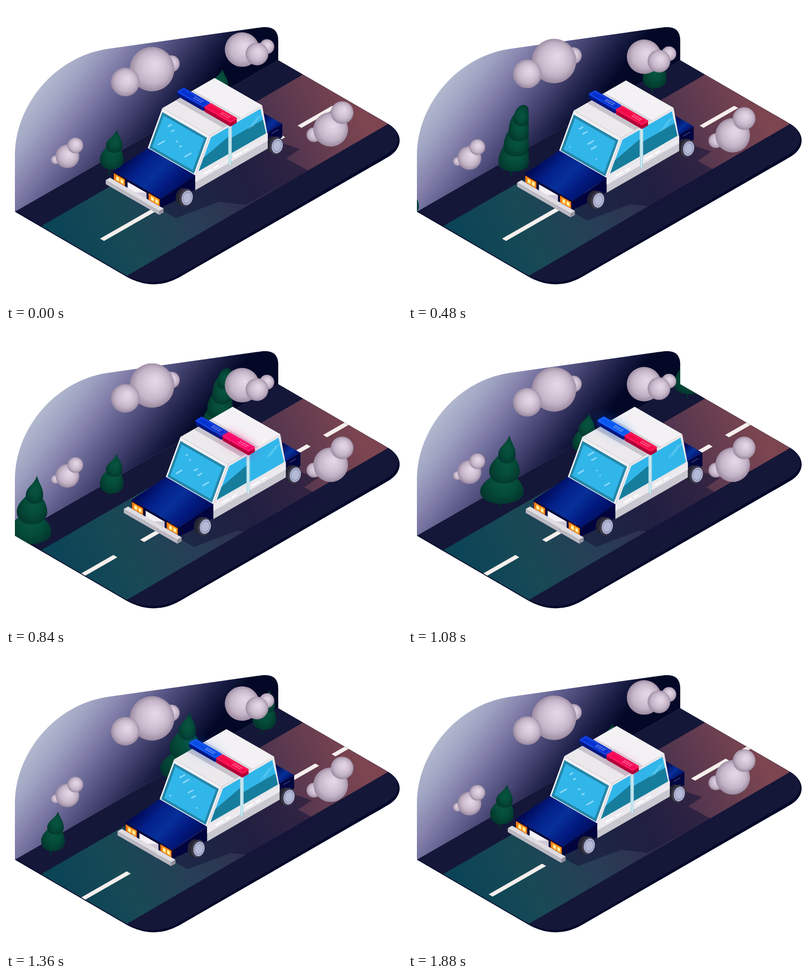
An HTML page that plays this animation: 800 px wide and 600 px high, repeating every 1920 ms.

```html
<!DOCTYPE html>
<html lang="en">
<head>
<meta charset="utf-8">
<title>Police car at night</title>
<style>
html, body { margin: 0; width: 100%; height: 100%; overflow: hidden; background: #fff; }
svg { display: block; width: 800px; height: 600px; }
</style>
</head>
<body>
<svg id="stage" viewBox="0 0 800 600" xmlns="http://www.w3.org/2000/svg"></svg>
<script>
const LOOP = 1920, STEP = 40, STEPS = LOOP / STEP, TAU = 2 * Math.PI;
const SLOPE = .577;
const stage = document.getElementById('stage');

// Drawing helpers
const poly = (points, fill, extra = '') => `<polygon points="${points.join(' ')}" fill="${fill}" ${extra}/>`;
const path = (d, fill) => `<path d="${d}" fill="${fill}"/>`;
const line = (points, color, width, extra = '') =>
  `<polyline points="${points.join(' ')}" fill="none" stroke="${color}" stroke-width="${width}" ${extra}/>`;
const stops = colors => colors.map((c, i) => `<stop offset="${i / (colors.length - 1)}" stop-color="${c}"/>`).join('');
const linear = (id, [x1, y1], [x2, y2], ...colors) =>
  `<linearGradient id="${id}" gradientUnits="userSpaceOnUse" x1="${x1}" y1="${y1}" x2="${x2}" y2="${y2}">${stops(colors)}</linearGradient>`;
const radial = (id, fx, fy, ...colors) =>
  `<radialGradient id="${id}" r=".55" fx="${fx}" fy="${fy}">${stops(colors)}</radialGradient>`;

// Isometric car space: a runs to the rear, b to the near side, h up
const WIDTH = 111, HOOD = 80, BELT = 34, ROOF = 98, ROOF_FRONT = 114, ROOF_END = 236, CABIN_END = 249, TAIL = 283;
const iso = (a, b, h) => [217 + .866 * (a + b), 362 + .5 * (b - a) - h];
const side = (a, h) => iso(a, WIDTH, h);
const front = (b, h) => iso(0, b, h);
const level = h => (a, b) => iso(a, b, h);
const shield = (b, s) => iso(HOOD + (ROOF_FRONT - HOOD) * s, b, BELT + (ROOF - BELT) * s);
const on = (plane, ...pairs) => pairs.map(p => plane(...p));
const rect = (plane, u0, v0, u1, v1) => on(plane, [u0, v0], [u1, v0], [u1, v1], [u0, v1]);

const box = (a0, a1, b0, b1, h0, h1, top, face, end) =>
  poly(rect(level(h1), a0, b0, a1, b1), top) +
  poly(rect((b, h) => iso(a0, b, h), b0, h0, b1, h1), face) +
  poly(rect((a, h) => iso(a, b1, h), a0, h0, a1, h1), end);

function wheel(a) {
  const [x, y] = iso(a, WIDTH, -1);
  const disc = (dx, rx, fill) => `<ellipse cx="${dx}" rx="${rx}" ry="${rx * 1.36}" fill="${fill}" transform="rotate(13)"/>`;
  return `<g transform="translate(${x} ${y})">${disc(-9, 13, '#252432')}${disc(-1, 13.5, '#3d3b4b')}
    ${disc(1, 11, '#b4b9d6')}${disc(1, 9, '#8a8fb2')}${disc(1, 7.8, '#b4b9d6')}</g>`;
}

function headlight(b) {
  const bulb = x => poly(rect(front, x, 12, x + 8, 21), '#ffd860') + poly(rect(front, x + 2, 14, x + 6, 19), '#fff6c8');
  return poly(rect(front, b, 10, b + 26, 24), '#f47a12') + bulb(b + 5) + bulb(b + 15);
}

function beacon(name, b0, b1, base, dark, bright, rim) {
  const shape = (h, inset) => rect(level(h), 152 + inset, b0 + inset, 166 - inset, b1 - inset);
  const slab = (h, color, extra = '') => poly(shape(h, 1), color, `stroke="${color}" stroke-width="5" stroke-linejoin="round" ${extra}`);
  const marks = [158, 162].map(a => line(on(level(111), [a, b0 + 30], [a, b0 + 50]), '#fff', 1.4, 'opacity=".5" stroke-dasharray="6 1"'));
  return slab(108, bright, `class="${name}" filter="url(#glow)"`) + slab(104, dark) + slab(107, dark) + slab(111, base) +
    slab(111, bright, `class="${name}"`) + poly(shape(111, 1), 'none', `stroke="${rim}" opacity=".6"`) + marks.join('');
}

const FRONT_WINDOW = on(side, [117, 93], [157, 93], [157, 39], [88, 39]);
const REAR_WINDOW = on(side, [165, 93], [232, 93], [245, 37], [165, 37]);
const SPARKS = Array.from({ length: 6 }, (_, i) => ({ b: 18 + 70 * (i * .618 % 1), s: .2 + .58 * (i * .37 % 1), phase: i * 1.1 }));

const carArt = () => [
  poly(rect(level(37), 230, 60, TAIL, WIDTH), 'url(#trunk)'),
  poly(rect(side, 240, 10, TAIL, 37), '#02063f'),
  line(on(side, [258, 30], [274, 30]), '#4b4fa0', 1.2),
  wheel(270),
  poly(on(side, [0, 27], [HOOD, BELT], [HOOD, 6], [30, 6], [0, 9]), '#02053d'),
  wheel(60),
  poly(rect(side, HOOD, 4, CABIN_END, 32), '#c9c7cf'),
  poly(rect(side, HOOD, 20, CABIN_END, 36), '#eceaee'),
  poly(rect(shield, 0, 0, WIDTH, 1), '#f1eff2'),
  poly(on(side, [ROOF_FRONT, ROOF], [ROOF_END, ROOF], [CABIN_END, 30], [HOOD, BELT]), '#e9e7eb'),
  poly(rect(level(ROOF), ROOF_FRONT, 0, ROOF_END, WIDTH), '#ebe9ec'),
  poly(rect(level(ROOF), 186, 0, ROOF_END, WIDTH), '#f3f1f3'),
  poly(rect(level(ROOF), 168, 0, 186, WIDTH), '#d8d5da'),
  poly(rect(shield, 3, .02, 107, .92), '#2587aa'),
  poly(rect(shield, 8, .08, 102, .86), '#31b6ea'),
  ...SPARKS.map(() => '<path class="spark" stroke="#c9efff" stroke-width="3" stroke-linecap="round" opacity=".6"/>'),
  poly(FRONT_WINDOW, '#31b6ea'),
  poly(on(side, [99, 60], [157, 74], [157, 39], [88, 39]), '#177d9c'),
  poly(REAR_WINDOW, '#31b6ea'),
  '<g clip-path="url(#rearGlass)"><g id="tint">' + poly(rect(side, 160, -10, 250, 68), '#177d9c') + '</g></g>',
  ...[205, 212].map(a => line(on(side, [a, 66], [a + 22, 80]), '#8fdcf6', 1.5, 'opacity=".6"')),
  line(on(side, [161, 94], [161, 15]), '#8fd0e0', 5),
  line(on(side, [161, 94], [161, 15]), '#eef8fa', 2),
  ...[100, 170].map(a => line(on(side, [a, 27], [a + 34, 27]), '#fff', 3, 'stroke-dasharray="18 5"')),
  poly(on(iso, [HOOD, 0, BELT], [HOOD, WIDTH, BELT], [0, WIDTH, 27], [0, 0, 27]), 'url(#hood)'),
  poly(rect(front, 0, 4, WIDTH, 27), '#03063a'),
  headlight(1), headlight(82),
  poly(rect(front, 33, 9, 77, 22), '#f4f0f5'),
  poly(on(front, [50, 9], [77, 9], [77, 22]), '#cfc8d8'),
  box(-10, 0, -8, 117, 2, 10, '#dfdce2', '#bbb8c2', '#96929f'),
  poly(rect(level(ROOF), 145, 0, 160, WIDTH), '#a39eac', 'opacity=".5"'),
  beacon('blue', -2, 58, '#0732d2', '#03177f', '#0b68ff', '#4384ff'),
  beacon('red', 61, 121, '#f5094a', '#b00238', '#ff0879', '#ff5c84')
].join('');

// Trees: stacked lobes that lean to the right
const TREES = {
  small: { lobes: 2, radius: 24, height: 88, taper: .3, blunt: 0, y: 407 },
  wide: { lobes: 3, radius: 44, height: 146, taper: .3, blunt: 0, y: 414 },
  tall: { lobes: 4, radius: 31, height: 142, taper: .17, blunt: 1, y: 411 }
};
// [kind, step at which the trunk passes x = 90]
const ROW = [['tall', 7], ['small', 16], ['wide', 23], ['small', 34], ['small', 43]];

function lobe(x, y, w, h, blunt) {
  const lean = 5, tx = x + lean, ty = y - h;
  const cw = w * (.25 + .6 * blunt), cy = ty + h * .3 * (1 - blunt);
  return `M${tx} ${ty}C${tx + cw} ${cy} ${x + w} ${y - .6 * h} ${x + w} ${y - .3 * h}` +
    `C${x + w} ${y - .1 * h} ${x + .5 * w} ${y} ${x} ${y}S${x - w} ${y - .1 * h} ${x - w} ${y - .3 * h}` +
    `C${x - w} ${y - .6 * h} ${tx - cw} ${cy} ${tx} ${ty}Z`;
}

function treeArt({ lobes, radius, height, taper, blunt }) {
  const rise = (height - 7) / (lobes + .4);
  let art = line([[0, 2], [0, -14]], '#02302b', 3);
  for (let i = 0; i < lobes; i++) {
    const tall = i < lobes - 1 ? 2 : 1.4;
    art += path(lobe(5 + 5 * i, -7 - rise * i, radius * (1 - taper * i), rise * tall, blunt), 'url(#leaf)');
  }
  return `<g class="tree">${art}</g>`;
}

// Clouds: balls as x, y, radius at mid height; time of the lowest point
const CLOUDS = [
  { balls: [[334, 111, 17], [295, 122, 45], [241, 148, 29]], low: 1600 },
  { balls: [[527, 94, 15], [477, 100, 35], [507, 109, 23]], low: 890 },
  { balls: [[100, 305, 9], [124, 298, 24], [140, 276, 16]], low: 300 },
  { balls: [[622, 273, 15], [656, 262, 35], [679, 228, 23]], low: 960 }
];
const cloudArt = ({ balls }) => `<g class="cloud">${balls.map(([x, y, r]) =>
  `<circle cx="${x}" cy="${y}" r="${r}" fill="url(#ball)"/>`).join('')}</g>`;

// Lane marks, drawn on slanted axes from x = 166, y = 490
const LANES = [{ from: 32, to: 450, dash: 108, gap: 54 }, { from: 490, to: 730, dash: 70, gap: 33 }];
const laneArt = ({ from, to, dash, gap }) =>
  `<line class="lane" x1="${from - 166}" x2="${to - 166}" stroke="#f5efec" stroke-dasharray="${dash} ${gap}"/>`;

const WALL = 'M18 417V300C19 205 94 104 205 87L518 43Q550 40 550 70V110Z';
const SLAB = 'M18 417L550 110L772 239C803 257 803 288 772 306L350 550Q298 579 244 549Z';
const FLOOR = 'M20 416L550 110L772 239C799 255 799 282 770 300L348 546Q298 573 244 547Z';
const ROAD = [[70, 447], [600, 139], [772, 239], [244, 547]];
const SHADE = [[300, 405], [343, 430], [430, 397], [484, 403], [612, 334], [566, 309], [594, 290], [540, 272]];

stage.innerHTML = `
<defs>
  ${linear('wall', [80, 150], [296, 312], '#b2b9ce', '#9fa3c2', '#8482ac', '#62608f', '#42406d', '#1e2149', '#030827')}
  ${linear('road', [100, 460], [700, 190], '#0b4457', '#184955', '#283e56', '#302d4c', '#5a384f', '#7c4550')}
  ${linear('hood', [255, 300], [345, 385], '#000a56', '#03208a', '#07309a', '#021a80', '#000c5c')}
  ${linear('trunk', [520, 225], [548, 255], '#000b52', '#06309a', '#00085a')}
  ${radial('ball', .58, .38, '#e6d8e8', '#d9cadb', '#c3b3c6', '#8f7e95')}
  ${radial('leaf', .58, .5, '#07553f', '#054c3a', '#02362d')}
  <filter id="glow" x="-60%" y="-60%" width="220%" height="220%"><feGaussianBlur stdDeviation="11"/></filter>
  <clipPath id="sceneClip"><path d="${WALL}${SLAB}"/></clipPath>
  <clipPath id="floorClip"><path d="${FLOOR}"/></clipPath>
  <clipPath id="rearGlass">${poly(REAR_WINDOW, '#000')}</clipPath>
</defs>
${path(WALL, 'url(#wall)')}${path(SLAB, '#020829')}${path(FLOOR, '#141738')}
<g clip-path="url(#floorClip)">
  ${poly(ROAD, 'url(#road)')}
  <g transform="matrix(1 -.5745 8 4.6 166 490)">${LANES.map(laneArt).join('')}</g>
  <g class="ride">${poly(SHADE, '#15153a', 'opacity=".55"')}</g>
</g>
<g clip-path="url(#sceneClip)">${ROW.map(([kind]) => treeArt(TREES[kind])).join('')}</g>
${CLOUDS.slice(0, 3).map(cloudArt).join('')}
<g class="ride">${carArt()}</g>
${cloudArt(CLOUDS[3])}`;

const all = name => [...stage.getElementsByClassName(name)];
const [rides, trees, clouds, lanes, sparks, blues, reds] =
  ['ride', 'tree', 'cloud', 'lane', 'spark', 'blue', 'red'].map(all);
const tint = document.getElementById('tint');
const move = (el, x, y) => el.setAttribute('transform', `translate(${x.toFixed(2)} ${y.toFixed(2)})`);
const light = (els, power) => els.forEach(el => el.setAttribute('opacity', Math.max(0, power)));

function draw(time) {
  const angle = TAU * time / LOOP, step = time / STEP;
  const sway = (1 - Math.cos(angle)) / 2;

  rides.forEach(el => move(el, 38 * sway, 10.2 * sway));
  move(tint, 0, 40 * sway ** 4);

  LANES.forEach(({ dash, gap }, i) =>
    lanes[i].setAttribute('stroke-dashoffset', -(dash + gap) * (step % 6) / 6));

  ROW.forEach(([kind, pass], i) => {
    const x = 23.72 * ((step - pass + 6 + STEPS) % STEPS - 6);
    move(trees[i], 90 + x, TREES[kind].y - SLOPE * x);
  });

  CLOUDS.forEach(({ low }, i) => move(clouds[i], 0, 12 * Math.cos(TAU * (time - low) / LOOP)));

  const flash = Math.sin(2 * angle);
  light(blues, flash);
  light(reds, -flash);

  SPARKS.forEach(({ b, s, phase }, i) => {
    const [x, y] = shield(b, s), size = .1 + 12 * Math.cos(angle + phase) ** 2;
    sparks[i].setAttribute('d', `M${x} ${y}l${size} ${-SLOPE * size}`);
  });
}

const start = performance.now();
function tick() {
  const time = (performance.now() - start) % LOOP;
  draw(Math.floor(time / STEP) * STEP);
  requestAnimationFrame(tick);
}
tick();
</script>
</body>
</html>
```
